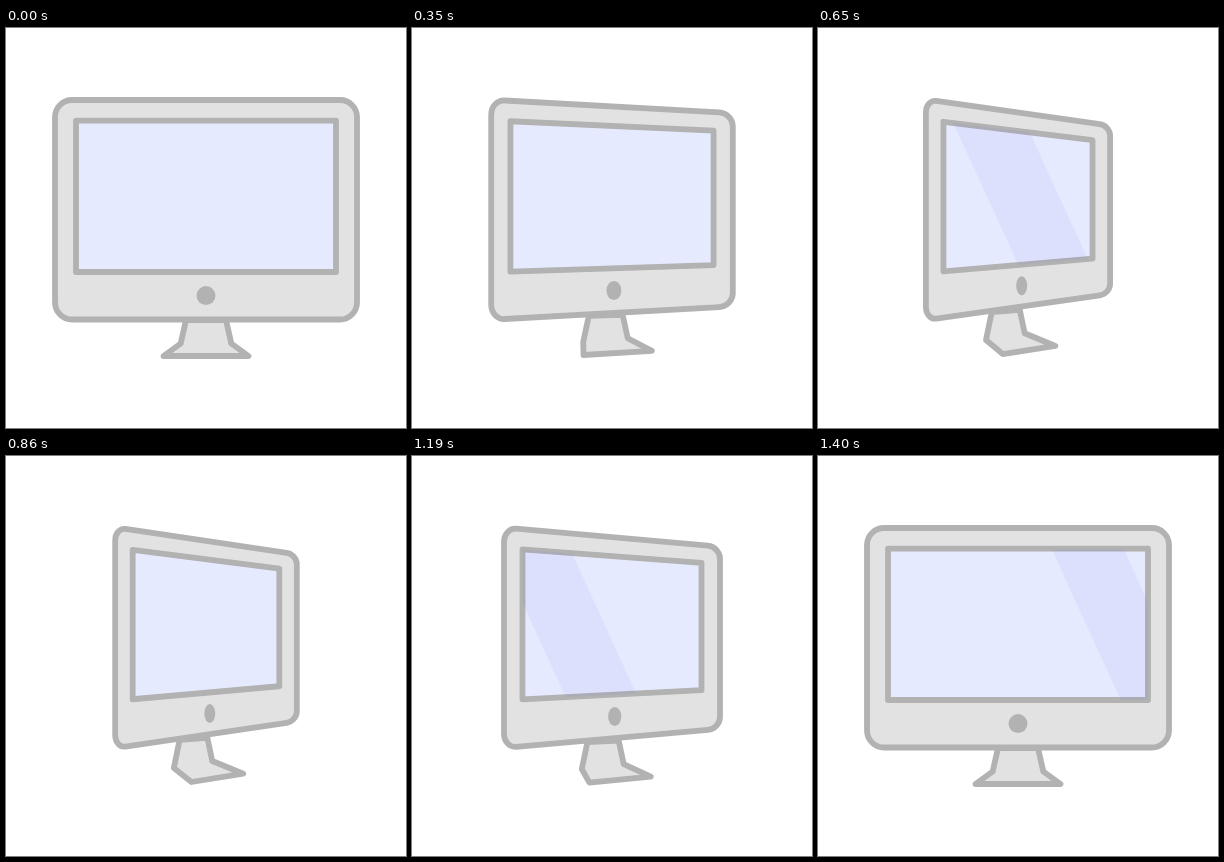
Animation of 400 by 400 pixels, one loop 1.85 s. Source, as an HTML page with a canvas:

```html
<!DOCTYPE html>
<html lang="en">
<head>
<meta charset="utf-8">
<title>Turning monitor</title>
<style>
  html, body { margin: 0; width: 100%; height: 100%; overflow: hidden; background: #fff; }
  canvas { display: block; width: 400px; height: 400px; }
</style>
</head>
<body>
<canvas id="stage" width="400" height="400"></canvas>
<script>
const ctx = document.getElementById('stage').getContext('2d');

const LOOP = 1850, HOLD = 230, STEP = 30, LAST = 40, HALF = 20;
const LINE = '#b2b2b2', BODY = '#e1e2e1', SCREEN = '#e6eafe', GLARE = 'rgba(105, 108, 228, 0.08)';
const CENTER = 200, HORIZON = 182;

const mix = (a, b, p) => a + (b - a) * p;

// cubic-bezier(1/3, 0, 0, 1)
function ease(x) {
  let lo = 0, hi = 1;
  for (let i = 0; i < 30; i++) {
    const s = (lo + hi) / 2;
    if (s * (1 - s) ** 2 + s ** 3 < x) lo = s; else hi = s;
  }
  return lo * lo * (3 - 2 * lo);
}

// Narrows x around the center and shrinks heights toward the right side.
const turner = (p, narrow) => (x, y) => [
  CENTER + (x - CENTER) * mix(1, narrow, p),
  y + (HORIZON - y) * (x - 55) * 0.00081 * p
];

function polygon(points) {
  const path = new Path2D();
  points.forEach(([x, y]) => path.lineTo(x, y));
  path.closePath();
  return path;
}

function bodyPath(p) {
  const turn = turner(p, 0.6);
  const path = new Path2D();
  const halfW = 151, halfH = 109.75, midY = 181.75;
  const rx = 17, ry = mix(17, 13, p);
  const corner = (sx, sy, inX, inY) =>
    turn(CENTER + sx * (halfW - inX * rx), midY + sy * (halfH - inY * ry));
  for (const [sx, sy] of [[-1, -1], [1, -1], [1, 1], [-1, 1]]) {
    // Clockwise order: alternate corners enter from the side or from the top.
    const side = sx === sy;
    const at = t => side ? corner(sx, sy, 0, t) : corner(sx, sy, t, 0);
    const to = t => side ? corner(sx, sy, t, 0) : corner(sx, sy, 0, t);
    path.lineTo(...at(1));
    path.bezierCurveTo(...at(0.45), ...to(0.45), ...to(1));
  }
  path.closePath();
  return path;
}

function screenPath(p) {
  const turn = turner(p, 0.5625);
  const [left, top, right, bottom] = [70, 92.7, 330, 244];
  return polygon([turn(left, top), turn(right, top), turn(right, bottom), turn(left, bottom)]);
}

function standPath(p) {
  const profile = [[20, 292], [25.3, 315.5], [42.5, 328]];
  const front = [
    ...profile.map(([w, y]) => [CENTER + w, y]),
    ...profile.map(([w, y]) => [CENTER - w, y]).reverse()
  ];
  const turned = [[201.3, 281.7], [206.2, 305], [237.2, 317.7], [185.5, 326], [167.8, 312], [173.6, 283.8]];
  return polygon(front.map((pt, i) => pt.map((v, j) => mix(v, turned[i][j], p))));
}

function paint(path, fill) {
  ctx.fillStyle = fill;
  ctx.fill(path);
  ctx.stroke(path);
}

// A slanted band; x is its left side at mid-screen height.
function glare(x) {
  const edge = y => x + (y - 168) * 0.458;
  ctx.fillStyle = GLARE;
  ctx.fill(polygon([[edge(80), 80], [edge(80) + 72, 80], [edge(260) + 72, 260], [edge(260), 260]]));
}

function draw(ms) {
  const step = ms < HOLD ? 0 : Math.min(LAST, 1 + Math.floor((ms - HOLD) / STEP));
  const p = ease(1 - Math.abs(step - HALF) / HALF);

  ctx.fillStyle = '#fff';
  ctx.fillRect(0, 0, 400, 400);
  ctx.strokeStyle = LINE;
  ctx.lineWidth = 5.8;
  ctx.lineJoin = 'round';

  const glass = screenPath(p);
  paint(standPath(p), BODY);
  paint(bodyPath(p), BODY);
  paint(glass, SCREEN);

  ctx.save();
  ctx.clip(glass);
  for (const end of [19.7, LAST]) glare(268 + 21.1 * (step - end));
  ctx.restore();

  const [, buttonY] = turner(p, 1)(CENTER, 267.6);
  ctx.fillStyle = LINE;
  ctx.beginPath();
  ctx.ellipse(CENTER + 3.8 * p, buttonY, mix(9.5, 5.4, p), 9.5, 0, 0, Math.PI * 2);
  ctx.fill();
}

const start = performance.now();
function tick() {
  draw((performance.now() - start) % LOOP);
  requestAnimationFrame(tick);
}
tick();
</script>
</body>
</html>
```
